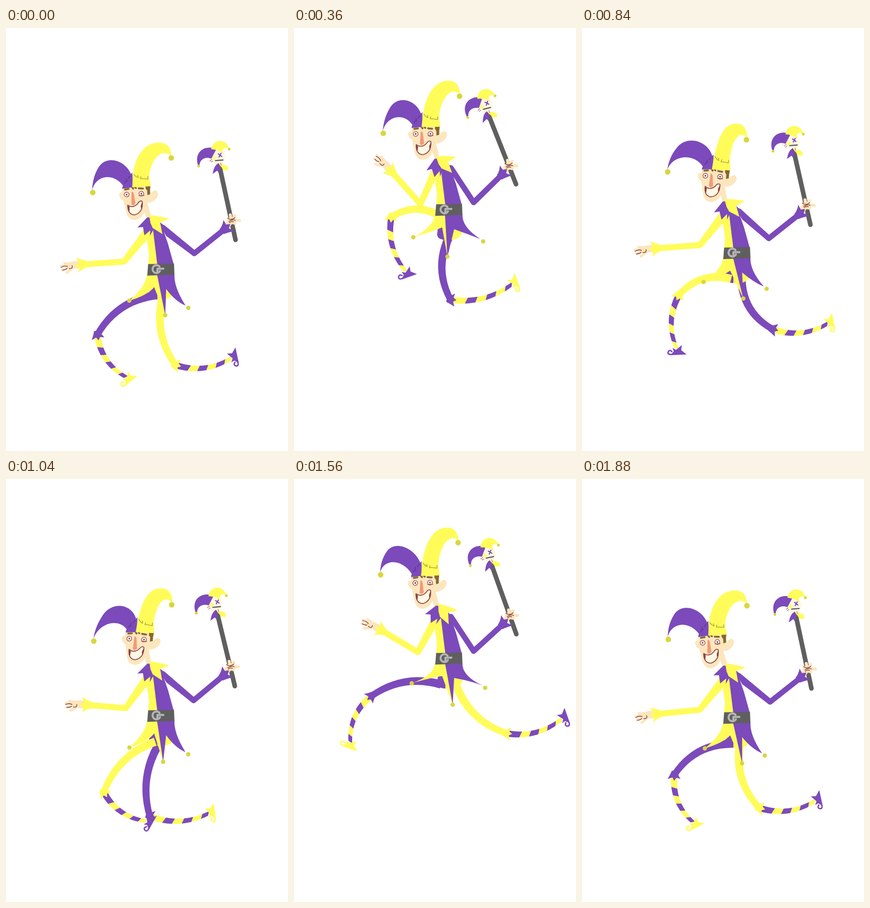
These frames come from a looping animation (611 by 917 pixels, 1.92 s). An HTML page with a canvas:

```html
<!DOCTYPE html>
<html lang="en">
<head>
<meta charset="utf-8">
<title>Running jester</title>
<style>
html, body { margin: 0; width: 100%; height: 100%; overflow: hidden; background: #fff; }
canvas { display: block; }
</style>
</head>
<body>
<canvas id="stage" width="611" height="917"></canvas>
<script>
const g = document.getElementById('stage').getContext('2d');
const LOOP = 1920, STEP = LOOP / 2, RAD = Math.PI / 180;
const PURPLE = '#7c4abb', YELLOW = '#fffc5a', SKIN = '#fce6bd', BELL = '#d9d63e',
  GREY = '#5f5f5f', BROWN = '#8c4042', HAIR = '#86682f', CREAM = '#fff8e4';

// Swinging value: mean plus cosine and sine parts
const wave = (mean, a, b, period = STEP) => t => {
  const p = 2 * Math.PI * t / period;
  return mean + a * Math.cos(p) + b * Math.sin(p);
};
const orbit = (x, y) => {
  const fx = wave(...x), fy = wave(...y);
  return t => [fx(t), fy(t)];
};

// The body hops once per step, floating a little at the top
const bodyY = t => {
  const p = 2 * Math.PI * (t - 12) / STEP;
  return 451 + 72 * Math.cos(p) - 9.4 * (1 - Math.cos(2 * p));
};
const hatL = orbit([189.5, -1.5, 4], [-170, 4, 11]);
const hatR = orbit([357.5, .5, 2.3], [-245, 4, 3.5]);
const elbowL = orbit([265, -9, 4], [-14, -2.5, 1]);
const wristL = orbit([185.5, -20.5, 15], [-46, 36, -16]);
const elbowR = orbit([397, 11, 0], [-23, -11, 0]);
const wristR = orbit([462, 13, -1.5], [-80.5, -7, -1.5]);
const tilt = wave(16.8, -4.9, 1.4);
const hemL = orbit([261, 6, 2.5], [62, 6.5, 4]);
const hemM = orbit([341, 4, -8], [101, -1, 1]);
const hemR = orbit([405, -10, -3], [74, 10, 3.5]);
const headTurn = wave(.3, -3.5, .6, LOOP);
const collarTurn = wave(-.5, .8, -9.5, LOOP);

// Key poses of a running leg: time, knee, ankle; the spline joins them
const poses = [
  [0, 367, 208, 488, 193],
  [280, 188, 130, 288, 195],
  [360, 211, 16, 242, 134],
  [600, 168, 82, 122, 182],
  [680, 212, 104, 155, 203],
  [840, 210, 92, 205, 208],
  [960, 198, 142, 260, 234],
  [1240, 296, 198, 425, 177],
  [1560, 460, 163, 580, 132],
  [1800, 413, 166, 532, 154]
];
function pose(t) {
  const n = poses.length;
  t %= LOOP;
  const i = poses.findLastIndex(p => p[0] <= t);
  const key = j => {
    const [time, ...rest] = poses[(j + n) % n];
    return [time + LOOP * Math.floor(j / n), ...rest];
  };
  const [a, b, c, d] = [-1, 0, 1, 2].map(k => key(i + k));
  const h = c[0] - b[0], s = (t - b[0]) / h, r = 1 - s;
  const slope = (p, q, w, k) => {
    const u = q[0] - p[0], v = w[0] - q[0];
    return (v * (q[k] - p[k]) / u + u * (w[k] - q[k]) / v) / (u + v);
  };
  return [1, 2, 3, 4].map(k => r * r * (1 + 2 * s) * b[k] + s * s * (3 - 2 * s) * c[k] +
    h * s * r * (r * slope(a, b, c, k) - s * slope(b, c, d, k)));
}

function fill(path, color) {
  g.fillStyle = color;
  g.fill(new Path2D(path));
}
function line(path, color, width) {
  g.strokeStyle = color;
  g.lineWidth = width;
  g.stroke(new Path2D(path));
}
function dot([x, y], r, color) {
  g.fillStyle = color;
  g.beginPath();
  g.arc(x, y, r, 0, 7);
  g.fill();
}
function group(x, y, turn, draw) {
  g.save();
  g.translate(x, y);
  g.rotate(turn);
  draw();
  g.restore();
}
const heading = (a, b) => Math.atan2(b[1] - a[1], b[0] - a[0]);

// Quadratic curve from a to b whose middle bows sideways
function bow(a, b, size) {
  const dx = b[0] - a[0], dy = b[1] - a[1], k = 2 * size / Math.hypot(dx, dy);
  return [a, [a[0] + dx / 2 - dy * k, a[1] + dy / 2 + dx * k], b];
}

// Tapered piece of a quadratic curve, with optionally slanted ends
function strip([p, c, q], from, to, w0, w1, color, slant = 0) {
  const edge = (s, side) => {
    s += slant * side;
    const r = 1 - s;
    const [x, y] = [0, 1].map(k => r * r * p[k] + 2 * r * s * c[k] + s * s * q[k]);
    const [dx, dy] = [0, 1].map(k => r * (c[k] - p[k]) + s * (q[k] - c[k]));
    const w = side * (w0 + (w1 - w0) * s) / 2 / Math.hypot(dx, dy);
    return `${x - dy * w} ${y + dx * w}`;
  };
  const n = 12, left = [], right = [];
  for (let i = 0; i <= n; i++) {
    const s = from + (to - from) * i / n;
    left.push(edge(s, 1));
    right.unshift(edge(s, -1));
  }
  fill(`M${left.concat(right).join('L')}Z`, color);
}

function cuff(p, turn, color, size = 1) {
  group(...p, turn, () => {
    g.scale(size, size);
    fill('M-10-7Q-2-8 9-17L7-6 15-1 7 4 12 16Q0 10-10 7Z', color);
  });
}

function leg(u, main, other) {
  const [kx, ky, ax, ay] = pose(u), knee = [kx, ky], ankle = [ax, ay];
  const hip = [300 + .11 * kx, 57 - .6 * Math.max(0, 80 - ky)];
  const thigh = bow(hip, knee, 18), shin = bow(knee, ankle, 14);
  for (let i = 0; i < 6; i++) {
    const end = .24 + .16 * i;
    strip(shin, i ? end - .16 : 0, Math.min(1, end), 14, 8, i % 2 ? main : other, -.025);
  }
  group(...ankle, heading(knee, ankle) - Math.PI / 2, () => {
    fill('M-9-1L-1 3 11-8 10 3 22 12-13 15Q-8 9-6 6Z', other);
    line('M-8 13Q-20 15-18 8Q-15 2-10 7', other, 3);
  });
  strip(thigh, 0, 1, 18, 14, main);
  dot(knee, 7, main);
  cuff(knee, heading(knee, shin[1]), main, .85);
}

function leftArm(t) {
  const e = elbowL(t), w = wristL(t), turn = heading(e, w);
  group(...w, turn + Math.PI, () => {
    fill('M6-6Q-12-11-28-6L-28 4Q-12 11 6 6Z', SKIN);
    line('M-22-4L-38-5M-20 0L-46 0M-22 2L-44 9M-18 4L-34 15', SKIN, 5.5);
    line('M-46 3Q-38-1-32 2M-43 9Q-36 9-33 6M-29 7Q-20 8-22 1', BROWN, 1.6);
  });
  fill(`M298-86L307-66 ${e[0] + 5} ${e[1] + 4} ${e[0] - 5} ${e[1] - 4}Z`, YELLOW);
  line(`M301-76L${e}L${w}`, YELLOW, 13);
  cuff(w, turn, YELLOW);
}

function staff() {
  line('M0 0L-1-158', GREY, 10);
  dot([0, -183], 16, CREAM);
  fill('M-2-170Q-12-168-19-150L-8-155-5-148 1-164Z', PURPLE);
  fill('M-1-168L10-164 17-158 15-150 5-154 2-162Z', YELLOW);
  fill('M-46-174C-50-205-22-217 0-201L-15-183C-28-191-40-186-43-174Z', PURPLE);
  fill('M-11-203C-4-223 24-223 28-196C18-203 10-200 13-188Q4-199-11-203Z', YELLOW);
  dot([-45, -173], 3, BELL);
  dot([27, -195], 3, BELL);
  line('M2-190L8-183M8-190L2-183', PURPLE, 2.4);
  line('M-8-188V-178M-12-183H-4', YELLOW, 2.4);
  line('M-7-177L9-175', GREY, 2.6);
  line('M-19-179l5-2M-17-176l4-1M-2-170l-1 6M3-170v5', BROWN, 1);
}

function rightArm(t) {
  const e = elbowR(t), w = wristR(t), a = tilt(t) * RAD;
  const hand = [w[0] + 13, w[1] - 20];
  group(hand[0] + 45 * Math.sin(a), hand[1] + 45 * Math.cos(a), -a, staff);
  line(`M${w}L${hand}`, SKIN, 13);
  group(...hand, 0, () => {
    line('M0 0L-2-10M3 0L8-8M0 1L18 2M-2 6L8 8', SKIN, 6.5);
    line('M-8-3Q0 3 8-4M-5 4Q4-1 9 2M-4 7Q0 3 5 5', BROWN, 1.6);
  });
  fill(`M326-108L347-72 ${e[0] - 3} ${e[1] + 5} ${e[0] + 3} ${e[1] - 5}Z`, PURPLE);
  line(`M340-90L${e}L${w}`, PURPLE, 12);
  cuff(w, heading(e, w), PURPLE);
}

function pelvis() {
  fill('M313 30L310 54Q311 66 329 66V30Z', PURPLE);
  fill('M328 30V66Q362 70 367 42L360 30Z', YELLOW);
}

function torso(t) {
  const l = hemL(t), m = hemM(t), r = hemR(t);
  fill('M300-95L318-98 329 0H307L310-32 306-58Z', YELLOW);
  fill('M317-98L336-98 351-55 364-8 328-8Z', PURPLE);
  fill(`M306 10Q303 38 ${l}Q${l[0] + 40} ${l[1] - 12} 321 39L${m}L328 10Z`, YELLOW);
  fill(`M327 10L365 10Q363 38 ${r[0] - 6} ${r[1] - 5}Q${r[0] - 28} ${r[1] - 14} 347 43L${m}Z`, PURPLE);
  for (const p of [l, m, r]) dot(p, 4.7, BELL);
  fill('M308-11L364-12 365 12 306 14Z', GREY);
  g.strokeStyle = '#b4b4b4';
  g.lineWidth = 4.5;
  g.beginPath();
  g.arc(326, 0, 8.5, .5, 5.6);
  g.stroke();
  line('M328-1H341M328-1V5', '#b4b4b4', 4.5);
}

function collar() {
  fill('M-14-12L-35 10-23 9-20 27-5 14-2-12Z', PURPLE);
  fill('M-6 0L-8 28 2 10Z', PURPLE);
  fill('M-10-17Q12-15 34-9L14-1 19 24-2 11-7 0Z', YELLOW);
}

// Drawn in its upright pose; only the horns bend towards their bells
function head(t) {
  const px = 305, py = -115, a = headTurn(t) * RAD;
  const local = ([x, y]) => {
    x -= px; y -= py;
    return [px + x * Math.cos(a) + y * Math.sin(a), py + y * Math.cos(a) - x * Math.sin(a) + 391];
  };
  const l = local(hatL(t)), r = local(hatR(t));
  const lag = (p, base, x, y, k) => `${x + k * (p[0] - base[0])} ${y + k * (p[1] - base[1])}`;
  const L = (x, y, k) => lag(l, [192, 227], x, y, k);
  const R = (x, y, k) => lag(r, [356, 145], x, y, k);
  group(px, py, a, () => {
    g.translate(-px, -py - 391);
    fill('M256 208L255 222C245 219 246 235 256 239L261 262Q263 283 280 283Q294 281 300 267' +
      'L306 284 314 274 308 248C322 247 331 238 332 230C332 218 321 220 316 230L317 208Z', SKIN);
    fill('M306 208H317L315 220 315 229 309 231 309 221 306 217Z', HAIR);
    line('M261 216L269 215M277 212l2 3M283 212l2 2M291 215L300 216', HAIR, 4);
    for (const p of [[264, 227], [296, 227]]) {
      dot(p, 5.8, BROWN);
      dot(p, 4.5, '#fff');
      dot(p, 1.9, BROWN);
    }
    line('M291 231H302', BROWN, 1.4);
    fill('M275 222Q279 220 280 228L282 247Q278 254 273 249Z', '#f19a7c');
    const mouth = 'M265 250Q264 271 279 272Q298 268 297 244Q292 240 287 248Q279 256 270 253Z';
    fill(mouth, CREAM);
    fill('M265 251L269 254 268 264Q264 260 265 251ZM297 244L293 254 294 261Q298 254 297 244Z', BROWN);
    line(mouth, BROWN, 1.8);
    fill(`M276 183C265 152 ${L(225, 142, .5)} ${L(207, 172, .8)}C${L(196, 190, 1)} ${L(192, 208, 1)} ` +
      `${L(191, 222, 1)}C${L(200, 189, .9)} ${L(238, 180, .3)} 257 207L255 214 279 212 279 180Z`, PURPLE);
    fill(`M277 212L280 186C286 148 ${R(300, 111, .7)} ${R(333, 111, .9)}Q${R(356, 112, 1)} ${R(357, 141, 1)}` +
      `C${R(336, 120, .9)} ${R(317, 155, .3)} 315 190L317 212Z`, YELLOW);
    line('M261 203l3-5M266 199l-1-6M270 192l4-5', '#5c358f', 1.6);
    line('M282 184q4 6 9 8M290 187l1 5M296 194l16 2M297 190l-1 5M312 190v6', '#b0a33c', 1.5);
    dot(l, 6, BELL);
    dot(r, 6, BELL);
  });
}

function draw(t) {
  g.fillStyle = '#fff';
  g.fillRect(0, 0, 611, 917);
  group(0, bodyY(t), 0, () => {
    leg(t + STEP, PURPLE, YELLOW);
    pelvis();
    leg(t, YELLOW, PURPLE);
    leftArm(t);
    rightArm(t);
    torso(t);
    head(t);
    group(320, -100, collarTurn(t) * RAD, collar);
  });
}

g.lineCap = g.lineJoin = 'round';
const start = performance.now();
function tick() {
  const t = (performance.now() - start) % LOOP;
  draw(Math.floor(t / 40) * 40);
  requestAnimationFrame(tick);
}
tick();
</script>
</body>
</html>
```
